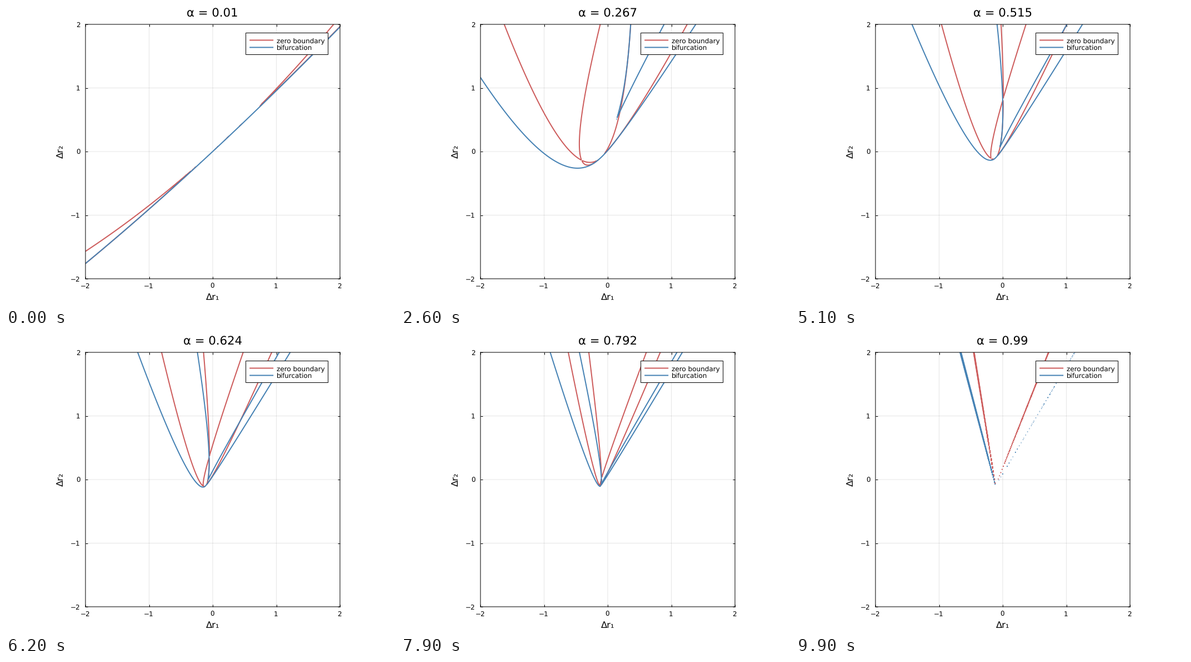
A matplotlib script for the animation above (10000 ms loop, 700 by 540 pixels).

```python
import numpy as np
import matplotlib.pyplot as plt
from matplotlib.animation import FuncAnimation
from matplotlib.patches import Rectangle

plt.rcParams.update({
    "font.family": "DejaVu Sans",
    "text.hinting": "no_hinting",
    "path.simplify": False,
    "path.snap": False,
})

W, H, DPI = 700, 540, 100
PX = 72 / DPI
FRAMES, INTERVAL = 100, 100
RED, BLUE = "#CD5C5C", "#4682B4"

# Every curve is one fixed shape scaled about APEX by (1 - alpha)^2 / alpha.
APEX = (-0.113, -0.1)
ZERO_A = (-0.1622, 0.3745, 0.4762)   # axis slope, linear term, width
ZERO_B = (0.3968, 0.4768, 0.3240)
E1, E2 = -0.262, 0.592               # slopes of the two fold rays
FOLD_H, FOLD_G = 0.1475, 0.7926
FOLD_SHIFT = (0.00915, 0.0730)

axis = np.linspace(-2, 2, 401)
R1, R2 = np.meshgrid(axis, axis)


def parabola(x, y, slope, lin, width):
    w = x - slope * y
    return width**2 * y - lin * width * w - w**2


def zero_boundary(x, y):
    return parabola(x, y, *ZERO_A) * parabola(x, y, *ZERO_B)


def bifurcation(x, y):
    """Discriminant of X^2 + hY = v1, Y^2 + gX = v2."""
    v2 = (x - E1 * y) / (E2 - E1)
    v1 = y - v2 - FOLD_SHIFT[0]
    v2 = v2 - FOLD_SHIFT[1]
    h2, g2 = FOLD_H**2, FOLD_G**2
    return (256 * (v1**2 * v2**2 - h2 * v2**3 - g2 * v1**3)
            + 288 * g2 * h2 * v1 * v2 - 27 * g2**2 * h2**2)


fig = plt.figure(figsize=(W / DPI, H / DPI), dpi=DPI, facecolor="white")

L, R, T, B = 143, 601, 33, 491
ax = fig.add_axes([L / W, 1 - B / H, (R - L) / W, (B - T) / H])
ax.set(xlim=(-2, 2), ylim=(-2, 2), xticks=range(-2, 3), yticks=range(-2, 3))
ax.tick_params(direction="in", length=4 * PX, width=PX, top=True, right=True,
               labelbottom=False, labelleft=False)
ax.set_axisbelow(True)
ax.grid(color="black", alpha=0.1, linewidth=PX)
for spine in ax.spines.values():
    spine.set_linewidth(PX)

# Overlay in pixel coordinates for text and legend
top = fig.add_axes([0, 0, 1, 1], zorder=5)
top.set(xlim=(0, W), ylim=(H, 0))
top.axis("off")


def label(x, y, text, size, ha="center", **kw):
    return top.text(x, y, text, fontsize=size * PX, ha=ha, va="baseline", **kw)


for v in range(-2, 3):
    name = str(v).replace("-", "\u2212")
    label(L - 0.6 + (v + 2) * (R - L) / 4, 507.7, name, 12)
    label(133.4, B - (v + 2) * (B - T) / 4 + 4.5, name, 12, ha="right")

label(372, 529, "Δr₁", 16.4)
label(103.3, 261.6, "Δr₂", 16.4, rotation=90, rotation_mode="anchor")
title = label(371.6, 18.5, "", 21.3)

top.add_patch(Rectangle((431.6, 48.5), 148, 39, facecolor="white",
                        edgecolor="black", linewidth=PX))
for y, color, name in ((61.5, RED, "zero boundary"), (74.5, BLUE, "bifurcation")):
    top.plot([438.2, 481.2], [y, y], color=color, lw=2 * PX,
             solid_capstyle="butt")
    label(486.8, y + 4.6, name, 12, ha="left")

curves = []


def update(i):
    while curves:
        curves.pop().remove()
    alpha = 0.01 + 0.98 * i / (FRAMES - 1)
    scale = (1 - alpha)**2 / alpha
    x, y = (R1 - APEX[0]) / scale, (R2 - APEX[1]) / scale
    for f, color in ((zero_boundary, RED), (bifurcation, BLUE)):
        curve = ax.contour(axis, axis, f(x, y), levels=[0], colors=color,
                           linewidths=2 * PX, linestyles="solid")
        curve.set(capstyle="round", joinstyle="round")
        curves.append(curve)
    title.set_text(f"α = {round(alpha, 3)}")
    return [title]


ani = FuncAnimation(fig, update, frames=FRAMES, interval=INTERVAL,
                    repeat=True, repeat_delay=0, blit=False)
plt.show()
```
